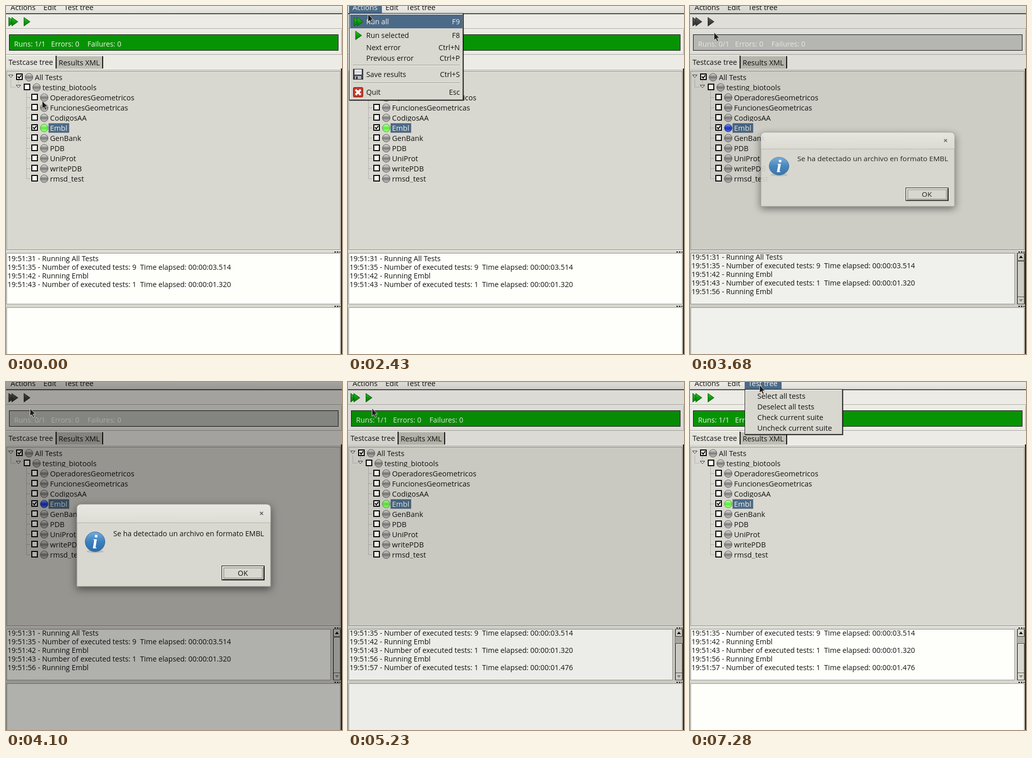
An HTML page for the animation above (8 s loop, 664 by 686 pixels).

```html
<!DOCTYPE html>
<html lang="en">
<head>
<meta charset="utf-8">
<title>Test runner</title>
<style>
html, body { margin: 0; width: 100%; height: 100%; overflow: hidden; background: #ecebe5; }
svg { display: block; width: 664px; height: 686px; }
text { font: 14.5px "Open Sans", "Noto Sans", sans-serif; fill: #111; white-space: pre; }
.small text, text.small { font-size: 14.2px; }
.light { fill: #f4f4ee; }
.anim { animation: 8s step-end -10ms infinite; }

/* run state: before, during, after */
.before { animation-name: before; }
.during { animation-name: during; }
.after { animation-name: after; }
.rest { animation-name: rest; }
@keyframes before { 0% { opacity: 1 } 42.25%, 100% { opacity: 0 } }
@keyframes during { 0% { opacity: 0 } 42.25% { opacity: 1 } 62.5%, 100% { opacity: 0 } }
@keyframes after { 0% { opacity: 0 } 62.5%, 100% { opacity: 1 } }
@keyframes rest { 0% { opacity: 1 } 42.25% { opacity: 0 } 62.5%, 100% { opacity: 1 } }

.hover { animation-name: hover; }
@keyframes hover { 0% { opacity: 0 } 10% { opacity: 1 } 12.875%, 100% { opacity: 0 } }

.actions { animation-name: actions; }
.runAll { animation-name: runAll; }
.runSel { animation-name: runSel; }
.edit { animation-name: edit; }
.tree { animation-name: tree; }
@keyframes actions { 0% { opacity: 0 } 23.125% { opacity: .6 } 24.125% { opacity: 1 } 41% { opacity: .5 } 42.25%, 100% { opacity: 0 } }
@keyframes runAll { 0% { opacity: 0 } 30.375% { opacity: 1 } 39.125%, 100% { opacity: 0 } }
@keyframes runSel { 0% { opacity: 0 } 39.125%, 100% { opacity: 1 } }
@keyframes edit { 0% { opacity: 0 } 79.125% { opacity: 1 } 90%, 100% { opacity: 0 } }
@keyframes tree { 0% { opacity: 0 } 90%, 100% { opacity: 1 } }

.dim { animation-name: dim; animation-timing-function: linear; }
@keyframes dim {
  0%, 45% { opacity: 0 } 46% { opacity: .05 } 51.25%, 63.125% { opacity: .31 }
  63.5% { opacity: .27 } 66%, 68.74% { opacity: .02 } 68.75%, 100% { opacity: 0 }
}
.dialog { animation-name: dialog; animation-timing-function: linear; transform-origin: 332px 322px; }
@keyframes dialog {
  0%, 44.125% { transform: scaleY(.3); opacity: 0 }
  46% { transform: scaleY(.89); opacity: .9 }
  47.25%, 61.875% { transform: scaleY(1); opacity: 1 }
  63.5% { transform: scaleY(.43); opacity: .98 }
  64.75%, 100% { transform: scaleY(.02); opacity: 0 }
}
.cursor { animation-name: cursor; }
@keyframes cursor {
  0% { transform: translate(71px, 187px) }
  7.5% { transform: translate(62px, 130px) }
  8.75% { transform: translate(46px, 58px) }
  10% { transform: translate(40px, 33px) }
  12.875% { transform: translate(40px, 24px) }
  14.125% { transform: translate(40px, 12px) }
  15.375% { transform: translate(39px, 6px) }
  30.375% { transform: translate(39px, 16px) }
  31.625% { transform: translate(39px, 23px) }
  32.875% { transform: translate(40px, 30px) }
  34.125% { transform: translate(41px, 36px) }
  35.375% { transform: translate(42px, 40px) }
  36.625% { transform: translate(43px, 43px) }
  39.125% { transform: translate(46px, 50px) }
  39.75% { transform: translate(47px, 52px) }
  71% { transform: translate(62px, 58px) }
  72.125% { transform: translate(84px, 48px) }
  73.125% { transform: translate(92px, 35px) }
  75.625% { transform: translate(92px, 27px) }
  76.875% { transform: translate(91px, 17px) }
  78.125% { transform: translate(90px, 9px) }
  81.25% { transform: translate(91px, 8px) }
  88.125% { transform: translate(100px, 8px) }
  89.125% { transform: translate(107px, 7px) }
  90% { transform: translate(124px, 7px) }
  91%, 100% { transform: translate(137px, 6px) }
}
</style>
</head>
<body>
<svg id="stage" viewBox="0 0 664 686"></svg>
<script>
const rect = (x, y, w, h, fill, more = '') =>
  `<rect x="${x}" y="${y}" width="${w}" height="${h}" fill="${fill}" ${more}/>`;
const frame = (x, y, w, h, fill, stroke, more = '') =>
  rect(x + .5, y + .5, w - 1, h - 1, fill, `stroke="${stroke}" ${more}`);
const path = (d, stroke, fill = 'none', more = '') =>
  `<path d="${d}" stroke="${stroke}" fill="${fill}" ${more}/>`;
const text = (x, y, str, more = '') => `<text x="${x}" y="${y}" ${more}>${str}</text>`;
const group = (cls, ...parts) => `<g class="${cls}">${parts.join('')}</g>`;
const anim = (name, ...parts) => group('anim ' + name, ...parts);
const END = 'text-anchor="end"';
const FACE = '#d9d8d0', BLUE = '#4b6a88';

const gradient = (id, ...colors) =>
  `<linearGradient id="${id}" x2="0" y2="1">${colors.map((c, i) =>
    `<stop offset="${i / (colors.length - 1)}" stop-color="${c}"/>`).join('')}</linearGradient>`;

const defs = `<defs>
  ${gradient('gray', '#f4f4f2', '#b4b4b2', '#7c7c7a', '#a4a4a2', '#c6c6c4')}
  ${gradient('green', '#d8ffcc', '#8cf870', '#5cea3c', '#7cfa58', '#b8ffa0')}
  ${gradient('blue', '#a0b4ff', '#4c68ea', '#1c38c4', '#2c4cdc', '#6c88f8')}
  ${gradient('go', '#22d422', '#109c10', '#0a7c0a')}
  ${gradient('stop', '#6c6c6a', '#444442', '#30302e')}
  ${gradient('info', '#74acdc', '#3c80bc', '#2c6ca8')}
  ${gradient('title', '#e8e7e1', '#dddcd5')}
  ${gradient('bar', '#edece6', '#dfded8')}
  <clipPath id="row"><rect x="0" y="-14" width="300" height="15.6"/></clipPath>
  <clipPath id="log"><rect x="1" y="488" width="660" height="99"/></clipPath>
  <filter id="shadow" x="-10%" y="-20%" width="120%" height="145%">
    <feDropShadow dx="0" dy="5" stdDeviation="8" flood-opacity=".5"/></filter>
</defs>`;

const arrow = (x, y, kind) =>
  path(`M${x} ${y}v17l12 -8.5z`, kind === 'go' ? '#0b5c0b' : '#2a2a28', `url(#${kind})`, 'stroke-linejoin="round"');
const single = (x, y, kind) => arrow(x, y, kind);
const double = (x, y, kind) => arrow(x, y, kind) + arrow(x + 6, y, kind);

const ball = (x, y, kind) =>
  `<circle cx="${x}" cy="${y}" r="7.5" fill="url(#${kind})" stroke="${
    { gray: '#50504e', green: '#3c9c28', blue: '#1c2c7c' }[kind]}"/>`;

const check = (x, y, on) =>
  rect(x + 1, y + 1, 11, 11, '#fefefa', 'stroke="#000" stroke-width="2"') +
  (on ? path(`M${x + 3.5} ${y + 6}l2.5 3l4 -5.5`, '#000', 'none', 'stroke-width="2"') : '');

const expander = (x, y) => path(`M${x - 4.5} ${y - 3}h9l-4.5 5z`, '#222', '#f4f4ee');
const label = (x, y, str, cls = '') =>
  `<g transform="translate(${x} ${y})" clip-path="url(#row)">${text(0, 0, str, `class="${cls}"`)}</g>`;

// toolbar, progress bar and tabs
function header() {
  const status = runs => group('small',
    text(16, 80, `Runs: ${runs}`, 'class="light"'),
    text(89, 80, 'Errors: 0', 'class="light"'),
    text(161, 80, 'Failures: 0', 'class="light"'));
  const icons = kind => double(5.5, 22.5, kind) + single(35.5, 22.5, kind);
  return rect(0, 0, 664, 686, '#ecebe5') + rect(0, 0, 664, 14, 'url(#bar)') +
    rect(0, 14, 664, 1, '#77766f') + rect(0, 15, 664, 1, '#1c1c1a') +
    text(9, 8, 'Actions') + text(74, 8, 'Edit') + text(115, 8, 'Test tree') +
    rect(0, 44, 664, 1, '#a3a29b') + rect(0, 45, 664, 1, '#fafaf6') +
    anim('hover', frame(27, 19, 26, 24, '#f2f1ec', '#8a8982')) +
    anim('rest', icons('go'), frame(6, 56, 651, 32, '#079404', '#111'), status('1/1')) +
    anim('during', icons('stop'), frame(6, 56, 651, 32, '#bfbfbb', '#111'), status('0/1')) +
    rect(0, 95, 664, 1, '#a3a29b') + rect(663, 46, 1, 50, '#a3a29b') +
    rect(0, 123, 664, 563, FACE) + rect(192, 123, 470, 1, '#fbfbf7') +
    rect(0, 97, 98, 27, '#e4e3dc') + rect(0, 97, 98, 1, '#fbfbf7') +
    rect(100, 99, 91, 24, '#bfbeb5') + rect(100, 98, 91, 1, '#f4f4ee') +
    rect(98, 98, 2, 25, '#111') + rect(190, 99, 2, 24, '#111') +
    text(5, 116, 'Testcase tree') + text(104, 117, 'Results XML') +
    rect(662, 123, 2, 563, '#1c1c1a');
}

function testTree() {
  const names = ['OperadoresGeometricos', 'FuncionesGeometricas', 'CodigosAA', 'Embl',
    'GenBank', 'PDB', 'UniProt', 'writePDB', 'rmsd_test'];
  const dots = 'stroke-dasharray="1 1"';
  let out = frame(1, 128, 660, 353, FACE, '#96958e') + path('M2 482.5H662', '#f8f8f4') +
    path('M9.5 145V160H19M24.5 147V152M40.5 167V340', '#888', 'none', dots) +
    expander(9.5, 139) + check(20, 133, true) + ball(45.5, 140.5, 'gray') + label(57, 146, 'All Tests') +
    expander(24.5, 159) + check(35, 153) + ball(60.5, 160.5, 'gray') + label(72, 166, 'testing_biotools');
  names.forEach((name, i) => {
    const y = 180 + i * 20, picked = name === 'Embl';
    out += path(`M41 ${y + .5}H49`, '#888', 'none', dots) + check(50, y - 7, picked);
    out += picked
      ? anim('rest', ball(75.5, y + .5, 'green')) + anim('during', ball(75.5, y + .5, 'blue')) +
        frame(84, y + 50 - 49, 0, 0, 'none', 'none') + frame(84, y - 9, 41, 19, BLUE, '#3a4a5a', dots)
      : ball(75.5, y + .5, 'gray');
    out += label(87, y + 6, name, picked ? 'light' : '');
  });
  return out;
}

function logPanel() {
  const lines = ['31 - Running All Tests', '35 - Number of executed tests: 9  Time elapsed: 00:00:03.514',
    '42 - Running Embl', '43 - Number of executed tests: 1  Time elapsed: 00:00:01.320',
    '56 - Running Embl', '57 - Number of executed tests: 1  Time elapsed: 00:00:01.476'];
  const show = (count, top) => `<g class="small" clip-path="url(#log)">${lines.slice(0, count)
    .map((s, i) => text(3, top + i * 17, '19:51:' + s)).join('')}</g>`;
  const bevel = (y, h) => frame(647, y, 14, h, FACE, '#3c3c38') + path(`M648.5 ${y + h - 2}V${y + 1.5}H659`, '#fafaf6');
  const scroll = top => rect(642, 487, 19, 101, FACE) + path('M641.5 487V588', '#96958e') +
    frame(646, 487, 16, 101, '#b4b3aa', '#77766f') + bevel(487, 15) + bevel(top, 574 - top) + bevel(573, 15) +
    path('M650 497h8l-4 -5z', 'none', '#111') + path('M650 578h8l-4 5z', 'none', '#888');
  const grip = y => path(`M649 ${y}h3M654 ${y}h3M659 ${y}h2`, '#111', 'none', 'stroke-width="2"');
  return frame(1, 487, 660, 101, '#fefffa', '#96958e') +
    anim('before', show(4, 503)) +
    anim('during', show(5, 500), scroll(503)) +
    anim('after', show(6, 483), scroll(515)) +
    grip(485) + grip(592) + frame(1, 594, 660, 100, '#fefffa', '#96958e');
}

const menu = (name, tab, tabW, title, titleX, w, h, body) => anim(name,
  rect(tab, 0, tabW, 14, BLUE), text(titleX, 8, title, 'class="light"'),
  rect(tab + 1, 15, w, h, '#000', 'opacity=".55"'), frame(tab, 14, w, h, FACE, '#111'),
  path(`M${tab + 1.5} ${h + 12}V15.5H${tab + w - 2}`, '#fafaf6'),
  path(`M${tab + 2} ${h + 12.5}H${tab + w - 1.5}V16`, '#96958e'), body);

function menus() {
  const item = (y, str, key, cls = '') =>
    text(36, y, str, `class="${cls}"`) + text(221, y, key, `class="${cls}" ${END}`);
  const rule = y => rect(10, y, 211, 1, '#96958e') + rect(10, y + 1, 211, 1, '#fafaf6');
  const all = double(12, 22.5, 'go'), sel = single(15, 49.5, 'go');
  const save = frame(10, 124, 20, 21, '#4a4c52', '#222') + rect(13, 125, 14, 10, '#f2f2f4') +
    rect(14, 128, 12, 1, '#a8a8b0') + rect(14, 131, 12, 1, '#a8a8b0') +
    rect(14, 138, 12, 6, '#b8bac0') + rect(16, 139, 3, 5, '#333');
  const quit = frame(10, 160, 20, 20, '#c8382c', '#6c1c14', 'rx="2"') +
    path('M15 165l10 10M25 165l-10 10', '#fff', 'none', 'stroke-width="4"');
  const actions = group('small', item(36, 'Run all', 'F9'), item(63, 'Run selected', 'F8'),
    item(87, 'Next error', 'Ctrl+N'), item(108, 'Previous error', 'Ctrl+P'),
    item(140, 'Save results', 'Ctrl+S'), item(175, 'Quit', 'Esc'),
    rule(116), rule(151), save, quit, all, sel,
    anim('runAll', rect(4, 17, 222, 27, BLUE), item(36, 'Run all', 'F9', 'light'), all),
    anim('runSel', rect(4, 45, 222, 26, BLUE), item(63, 'Run selected', 'F8', 'light'), sel));
  const edit = text(91, 33, 'Copy error message to clipboard') + text(378, 33, 'Ctrl+C', END);
  const tree = ['Select all tests', 'Deselect all tests', 'Check current suite', 'Uncheck current suite']
    .map((s, i) => text(133, 33 + i * 21, s)).join('');
  return menu('actions', 2, 65, 'Actions', 9, 226, 172, actions) +
    menu('edit', 66, 42, 'Edit', 74, 319, 26, edit) +
    menu('tree', 108, 73, 'Test tree', 115, 194, 90, tree);
}

function dialog() {
  return anim('dialog',
    path('M140 403V249q0 -8 8 -8H515q8 0 8 8V403z', '#8a8982', FACE, 'filter="url(#shadow)"'),
    path('M140.5 277V249q0 -7.5 8 -7.5H514.5q8 0 8 7.5V277z', 'none', 'url(#title)'),
    rect(140, 277, 383, 1, '#b4b3aa'),
    path('M502 256l6 6M508 256l-6 6', '#444', 'none', 'stroke-width="1.3"'),
    '<ellipse cx="176" cy="334" rx="17" ry="3" opacity=".13"/>',
    '<circle cx="176" cy="315" r="19.5" fill="url(#info)" stroke="#3470a4"/>',
    text(176, 328, 'i', 'text-anchor="middle" style="font:italic bold 37px \'Liberation Serif\',serif;fill:#fff"'),
    text(212, 304, 'Se ha detectado un archivo en formato EMBL', 'class="small"'),
    frame(426, 362, 85, 29, FACE, '#000'), path('M427.5 389V363.5H509', '#fff'),
    path('M428 389.5H509.5V364', '#222', 'none', 'stroke-width="1.5"'),
    frame(430, 366, 77, 21, 'none', '#222', 'stroke-dasharray="1 1"'),
    text(468, 382, 'OK', 'class="small" text-anchor="middle"'));
}

const cursor = anim('cursor',
  path('M.5 0V15.5L4 12.3L6.7 18L9.2 16.8L6.6 11.2H11.3Z', '#d4d4d0', '#1c1c1c', 'stroke-linejoin="round"'));

document.getElementById('stage').innerHTML = defs + header() + testTree() + logPanel() +
  anim('dim', rect(0, 0, 664, 686, '#000')) + dialog() + menus() + cursor;
</script>
</body>
</html>
```
